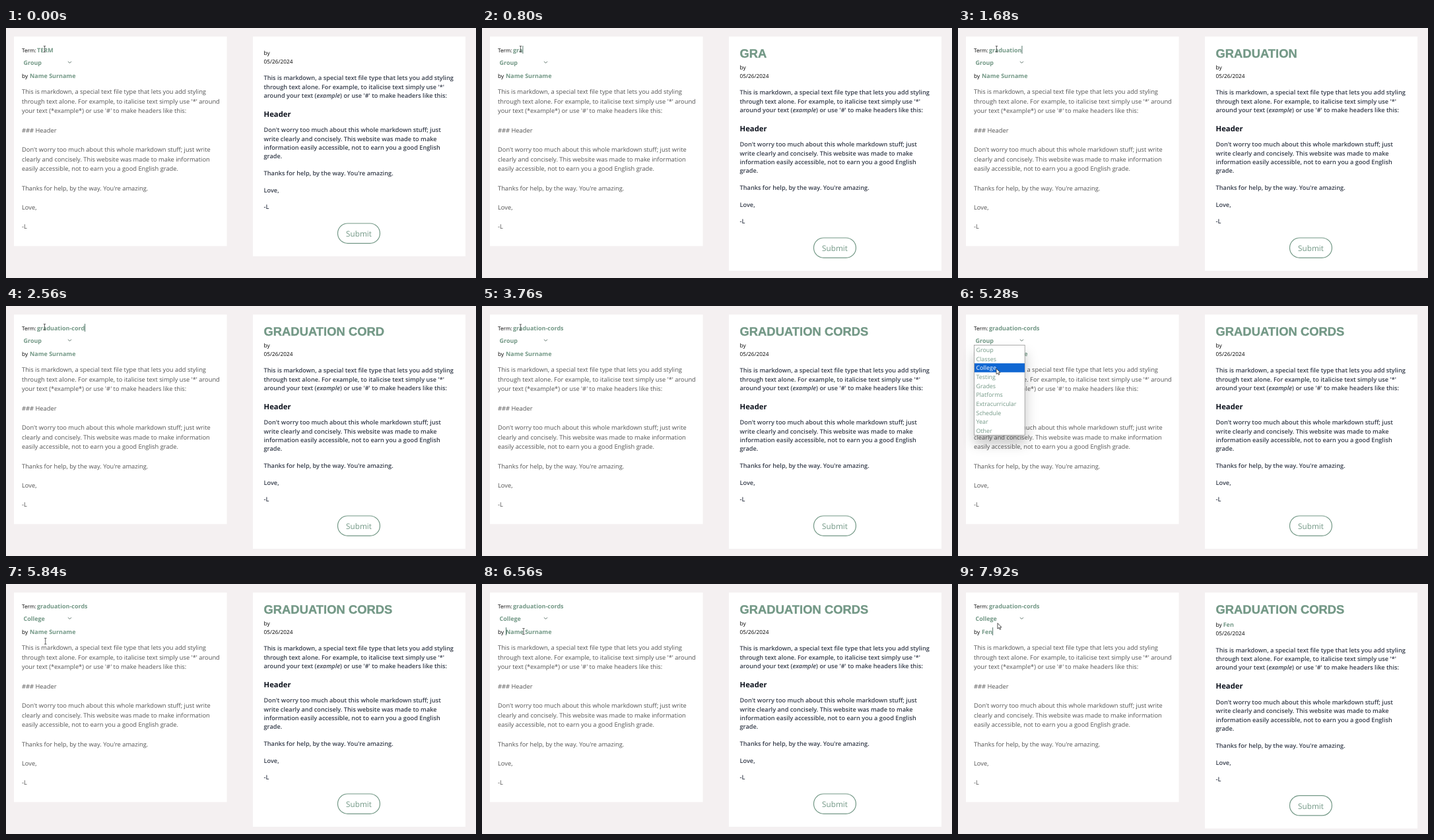
Animation of 712 by 380 pixels, one loop 8 s. Source, as an HTML page:

```html
<!DOCTYPE html>
<html lang="en">
<head>
<meta charset="utf-8">
<title>Markdown editor</title>
<style>
html, body { margin: 0; height: 100%; overflow: hidden; background: #f4f0f1; }
svg { display: block; width: 712px; height: 380px; }
text { font-family: "Open Sans", "Noto Sans", sans-serif; text-rendering: geometricPrecision; white-space: pre; }
.label { font-size: 8.1px; fill: #000; }
.field { font-size: 8.97px; font-weight: 700; fill: #739886; }
.raw { font-size: 9.32px; fill: #555; }
.rich { font-size: 9.21px; font-weight: 600; fill: #363d4b; }
.head { font-size: 11.3px; font-weight: 700; fill: #0d121d; }
.title { font: bold 18.4px "Liberation Sans", Arial, sans-serif; fill: #739886; stroke: #739886; stroke-width: .35px; }
.submit { font-size: 11.75px; fill: #739886; }
.option { font-size: 8.92px; fill: #739886; }
#menu { filter: drop-shadow(1px 13px 9px rgba(0, 0, 0, .22)); }
</style>
</head>
<body>
<svg id="stage" viewBox="0 0 712 380"></svg>
<script>
const stage = document.getElementById('stage');

function add(parent, tag, attrs, content = '') {
  const el = document.createElementNS('http://www.w3.org/2000/svg', tag);
  for (const key in attrs) el.setAttribute(key, attrs[key]);
  el.textContent = content;
  parent.append(el);
  return el;
}
const write = (parent, cls, x, y, str) => add(parent, 'text', { class: cls, x, y }, str);
const show = (el, on) => el.setAttribute('visibility', on ? 'visible' : 'hidden');
const shift = (el, x, y) => el.setAttribute('transform', `translate(${x} ${y})`);

// Editor card
add(stage, 'rect', { x: 12, y: 13, width: 322.5, height: 318.5, fill: '#fff' });
write(stage, 'label', 24, 36.8, 'Term:');
const termField = write(stage, 'field', 47, 36.8, '');
const groupField = write(stage, 'field', 26.5, 56.2, '');
add(stage, 'path', { d: 'M94 50.8l2.5 2.5 2.5-2.5', fill: 'none', stroke: '#60756c' });
write(stage, 'label', 24, 75.6, 'by').style.fontSize = '8.4px';
const nameField = write(stage, 'field', 36, 75.6, '');
[
  'This is markdown, a special text file type that lets you add styling',
  "through text alone. For example, to italicise text simply use '*' around",
  "your text (*example*) or use '#' to make headers like this:", '',
  '### Header', '',
  "Don't worry too much about this whole markdown stuff; just write",
  'clearly and concisely. This website was made to make information',
  'easily accessible, not to earn you a good English grade.', '',
  "Thanks for help, by the way. You're amazing.", '',
  'Love,', '',
  '-L'
].forEach((line, i) => write(stage, 'raw', 24, 100.1 + 14.65 * i, line));

// Preview card
const paper = add(stage, 'rect', { x: 374, y: 13, width: 322, fill: '#fff' });
const title = write(stage, 'title', 390.5, 45, '');
const byline = add(stage, 'g');
write(byline, 'label', 390.5, 41.3, 'by').style.fontSize = '8.4px';
const author = write(byline, 'field', 401.7, 41.3, '');
const body = add(stage, 'g');
write(body, 'label', 390.5, 53.7, '05/26/2024').style.fontSize = '8.28px';
const rich = (y, str) => write(body, 'rich', 390.5, y, str);
rich(79.1, 'This is markdown, a special text file type that lets you add styling');
rich(92.5, "through text alone. For example, to italicise text simply use '*'");
const mixed = rich(105.9, 'around your text (');
add(mixed, 'tspan', { 'font-style': 'italic' }, 'example');
add(mixed, 'tspan', {}, ") or use '#' to make headers like this:");
write(body, 'head', 390.5, 134.9, 'Header');
rich(158.2, "Don't worry too much about this whole markdown stuff; just");
rich(171.6, 'write clearly and concisely. This website was made to make');
rich(185, 'information easily accessible, not to earn you a good English');
rich(198.4, 'grade.');
rich(224.2, "Thanks for help, by the way. You're amazing.");
rich(250, 'Love,');
rich(275.4, '-L');
add(body, 'rect', { x: 502.5, y: 297, width: 64, height: 30.3, rx: 15.15, fill: 'none', stroke: '#739886', 'stroke-width': 1.2 });
write(body, 'submit', 534.5, 317.3, 'Submit').setAttribute('text-anchor', 'middle');

// Caret, menu and pointer
const caret = add(stage, 'rect', { width: 1, height: 12, fill: '#52766a' });
const menu = add(stage, 'g', { id: 'menu' });
const rowHeight = 13.62, menuTop = 59.9;
add(menu, 'rect', { x: 24.6, y: 59.6, width: 76.6, height: 136.7, fill: '#fff', stroke: '#8a8a8a', 'stroke-width': .7 });
const bar = add(menu, 'rect', { x: 25, width: 76, height: rowHeight, fill: '#1067d2' });
const options = ['Group', 'Classes', 'College', 'Testing', 'Grades', 'Platforms',
  'Extracurricular', 'Schedule', 'Year', 'Other']
  .map((name, i) => write(menu, 'option', 27.5, menuTop + 10.3 + i * rowHeight, name));
const arrow = add(stage, 'path', { d: 'M0 0v8.6l2-1.8 1.4 3 1.4-.7-1.4-2.8h2.6z', fill: '#fff', stroke: '#222', 'stroke-width': .8 });
const beam = add(stage, 'path', { d: 'M-1.7-4.5h3.4M0-4.5v9M-1.7 4.5h3.4', fill: 'none', stroke: '#555', 'stroke-width': .9 });

const LOOP = 8000, MENU_OPEN = 4880, MENU_CLOSE = 5560, NAME_FOCUS = 6320;
const term = 'graduation-cords';
const termKeys = [320, 560, 720, 960, 1120, 1200, 1280, 1360, 1520, 1600, 1760, 2000, 2160, 2320, 2480, 2720];
const person = 'Fen';
const nameKeys = [7280, 7520, 7760];
const path = [
  [0, 58.5, 32], [3700, 58.5, 32], [4320, 52.5, 50], [4900, 52.5, 50], [5200, 58, 95],
  [5600, 58, 95], [6200, 63, 72], [7150, 63, 72], [7700, 60, 59.5], [LOOP, 60, 59.5]
];

function pointerAt(t) {
  const i = path.findIndex(p => p[0] > t);
  const [t0, x0, y0] = path[i - 1], [t1, x1, y1] = path[i];
  const u = (t - t0) / (t1 - t0), k = u * u * (3 - 2 * u);
  return [x0 + (x1 - x0) * k, y0 + (y1 - y0) * k];
}

function draw(t) {
  const typed = keys => keys.filter(k => k <= t).length;
  const n = typed(termKeys), m = typed(nameKeys);
  const termText = term.slice(0, n), nameText = person.slice(0, m);
  termField.textContent = termText || 'TERM';
  nameField.textContent = nameText || 'Name Surname';
  groupField.textContent = t < MENU_CLOSE ? 'Group' : 'College';

  title.textContent = termText.replace('-', ' ').toUpperCase();
  author.textContent = nameText;
  const top = n ? 22 : 0, drop = m ? 2.6 : 0;
  shift(byline, 0, top + drop / 2);
  shift(body, 0, top + drop);
  paper.setAttribute('height', 334 + top + drop);

  const inName = t >= NAME_FOCUS;
  const since = inName ? nameKeys[m - 1] ?? NAME_FOCUS : termKeys[n - 1] ?? -600;
  const field = inName ? nameField : termField;
  const filled = inName ? m : n;
  caret.setAttribute('x', (inName ? 36 : 47) + (filled ? field.getComputedTextLength() : 0));
  caret.setAttribute('y', inName ? 66 : 27);
  show(caret, (t < MENU_OPEN || inName) && (t - since) % 1060 < 530);

  const [x, y] = pointerAt(t);
  const open = t >= MENU_OPEN && t < MENU_CLOSE;
  show(menu, open);
  const row = Math.max(0, Math.floor((y - menuTop) / rowHeight));
  bar.setAttribute('y', menuTop + row * rowHeight);
  options.forEach((o, i) => o.style.fill = i === row ? '#fff' : '');

  const overText = !open && (y < 42 || y > 66);
  show(beam, overText);
  show(arrow, !overText);
  shift(overText ? beam : arrow, x, y);
}

function tick() {
  draw(performance.now() % LOOP);
  requestAnimationFrame(tick);
}
tick();
</script>
</body>
</html>
```
